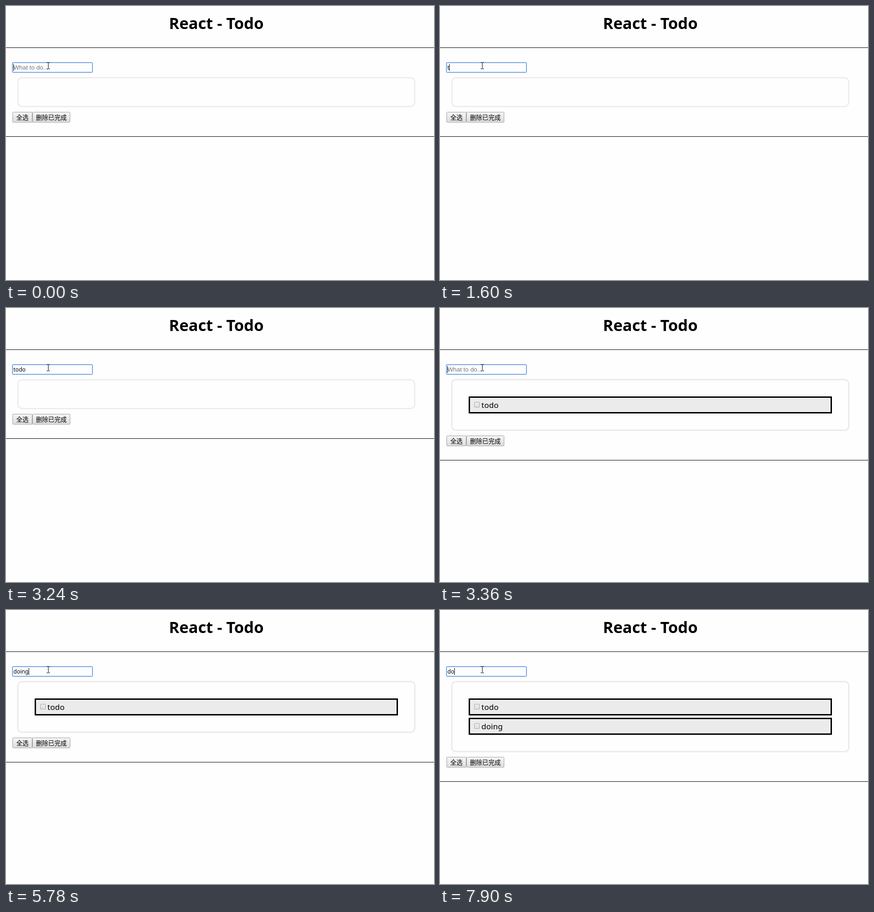
Write an HTML page with a canvas that moves like this. It is 926 px wide and 595 px high and loops after 8 s.

```html
<!DOCTYPE html>
<html lang="zh">
<head>
<meta charset="utf-8">
<title>React - Todo</title>
<style>
  html, body { margin: 0; width: 100%; height: 100%; overflow: hidden; background: #fefefe; }
  canvas { display: block; }
</style>
</head>
<body>
<canvas id="stage" width="926" height="595"></canvas>
<script>
const ctx = document.getElementById('stage').getContext('2d');
const LOOP = 8000;
const PAPER = '#fefefe', GREY = '#ebebeb', INK = '#000';
const UI = '"Noto Sans", "Open Sans", sans-serif';
const CJK = '13.33px "Noto Sans CJK SC", "Noto Sans CJK", sans-serif';
const TODOS = ['todo', 'doing'];

// [start ms, typed text, caret x (0 = hidden), number of todos]
const STEPS = [
  [0, '', 16, 0], [270, '', 0, 0], [730, '', 16, 0], [1290, '', 0, 0],
  [1600, 't', 20, 0], [1970, 'to', 27, 0], [2250, 'tod', 35, 0],
  [2680, 'todo', 42, 0], [3240, 'todo', 0, 0],
  [3360, '', 16, 1], [3790, '', 0, 1], [4400, '', 16, 1], [4930, '', 0, 1],
  [5080, 'd', 23, 1], [5230, 'do', 31, 1], [5380, 'doi', 34, 1],
  [5630, 'doin', 41, 1], [5780, 'doing', 49, 1],
  [6370, '', 16, 2], [6960, '', 0, 2], [7460, '', 16, 2], [7900, 'do', 31, 2]
];

function fill(x, y, w, h, color) {
  ctx.fillStyle = color;
  ctx.fillRect(x, y, w, h);
}

function text(str, x, y, font, color = INK, align = 'left') {
  ctx.font = font;
  ctx.fillStyle = color;
  ctx.textAlign = align;
  ctx.fillText(str, x, y);
}

// Rounded frame whose stroke lies inside the given box
function frame(x, y, w, h, radius, line, color) {
  ctx.beginPath();
  ctx.roundRect(x + line / 2, y + line / 2, w - line, h - line, radius);
  ctx.lineWidth = line;
  ctx.strokeStyle = color;
  ctx.stroke();
}

function shaded(x, y, w, h, border, from, to, radius) {
  const shade = ctx.createLinearGradient(0, y, 0, y + h);
  shade.addColorStop(0, from);
  shade.addColorStop(1, to);
  fill(x + 1, y + 1, w - 2, h - 2, shade);
  frame(x, y, w, h, radius, 1, border);
}

function button(label, x, y, w) {
  shaded(x, y, w, 23, '#a0a0a0', '#f6f6f6', '#dcdcdc', 1);
  text(label, x + w / 2, y + 17, CJK, INK, 'center');
}

function input(value, caret) {
  frame(14, 123, 173, 21, 1, 1, '#a9c6f5');
  frame(13, 122, 175, 23, 2, 1, '#86aef0');
  frame(13.5, 122.5, 174, 22, 1.5, 1, '#5a92e8');
  if (value) text(value, 16, 138, '12.1px ' + UI);
  else text('What to do...', 16, 138, '13.33px "Liberation Sans", Arial, sans-serif', '#757575');
  if (caret) fill(caret, 126, 1, 15, INK);
}

function todo(label, y) {
  fill(62, y, 786, 37, INK);
  fill(65, y + 3, 780, 31, GREY);
  shaded(74, y + 12, 12, 12, '#a8a8a8', '#eeeeee', '#dedede', 1.5);
  text(label, 89.6, y + 25, '17px ' + UI);
}

function pointer() {
  fill(88, 122, 3, 1, INK);
  fill(92, 122, 3, 1, INK);
  fill(91, 123, 1, 13, INK);
  fill(88, 136, 3, 1, INK);
  fill(92, 136, 3, 1, INK);
}

function draw(ms) {
  const [, value, caret, count] = STEPS.findLast(step => step[0] <= ms);
  const bottom = count ? 225 + 42 * count : 219.5;
  const buttonY = count ? 235 + 42 * count : 230;

  fill(0, 0, 926, 595, PAPER);
  text('React - Todo', 455, 50, 'bold 34px ' + UI, INK, 'center');
  fill(0, 90, 926, 1, INK);
  input(value, caret);

  if (count) frame(24, 154, 862, bottom - 154, 9, 3, GREY);
  else frame(24.5, 154.5, 861, bottom - 154.5, 9, 2.5, GREY);
  TODOS.slice(0, count).forEach((label, i) => todo(label, 192 + 42 * i));

  button('全选', 14, buttonY, 43);
  button('删除已完成', 57, buttonY, 82);
  fill(0, buttonY + 53, 926, 1, INK);
  pointer();
}

const start = performance.now();
function tick() {
  draw((performance.now() - start) % LOOP);
  requestAnimationFrame(tick);
}
tick();
</script>
</body>
</html>
```
